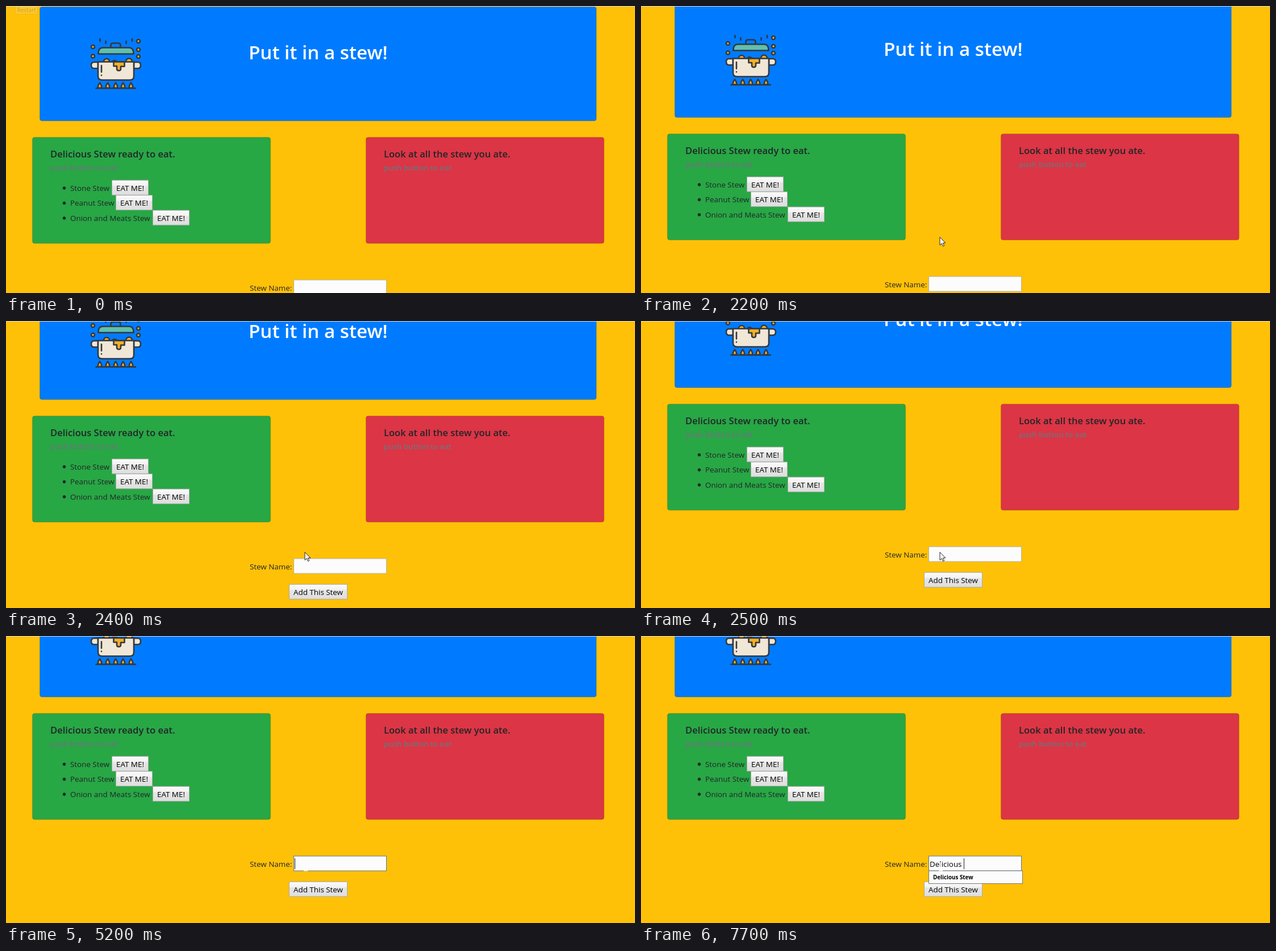
These frames come from a looping animation (1107 by 506 pixels, 8000 ms). An HTML page:

```html
<!DOCTYPE html>
<html lang="en">
<head>
<meta charset="utf-8">
<title>Put it in a stew!</title>
<style>
  html, body { margin: 0; width: 100%; height: 100%; overflow: hidden; background: #ffc107; }
  svg { display: block; width: 100vw; height: 100vh; }
  text { font: 13.4px "Open Sans", "Noto Sans", sans-serif; fill: #212529; white-space: pre; }
  .title { font-size: 33.2px; font-weight: 600; fill: #fff; text-anchor: middle; }
  .heading { font-size: 16.55px; font-weight: 600; }
  .hint { font-size: 13.25px; font-weight: 600; fill: #6c757d; }
  .label { fill: #000; text-anchor: middle; }
  .option { font-size: 9.8px; font-weight: 700; fill: #000; }
  .card { stroke: #000; stroke-opacity: .16; }
  .button { fill: url(#face); stroke: #a9a9a9; }
  .ink { stroke: #333840; stroke-width: 2.6; stroke-linejoin: round; stroke-linecap: round; }
</style>
</head>
<body>
<svg viewBox="0 0 1107 506" xmlns="http://www.w3.org/2000/svg">
  <defs>
    <linearGradient id="face" x2="0" y2="1">
      <stop offset="0" stop-color="#fbfbfb"/>
      <stop offset=".36" stop-color="#f2f2f2"/>
      <stop offset=".4" stop-color="#e6e6e6"/>
      <stop offset="1" stop-color="#dedede"/>
    </linearGradient>
  </defs>
  <rect width="1107" height="506" fill="#ffc107"/>
  <g id="page">
    <rect x="59.5" y="1.5" width="979.5" height="201" rx="4" fill="#007bff" class="card"/>
    <g id="pot" class="ink" fill="none"></g>
    <text x="549.3" y="94" class="title">Put it in a stew!</text>
    <g id="cards"></g>
    <text x="429" y="502">Stew Name:</text>
    <rect id="field" x="506.5" y="483" width="163" height="26" fill="#fcfcfc"/>
    <g id="add"></g>
  </g>
  <g id="menu">
    <rect id="menuBox" x="506.5" y="414" width="165" fill="#fcfcfc" stroke="#777"/>
    <text x="514" y="428.5" class="option">Delicious Stew</text>
    <text id="second" x="514" y="450" class="option">Dumpling Stew</text>
  </g>
  <text id="typed" x="508" y="407" style="fill:#000"></text>
  <path id="caret" d="M.5 392v19" stroke="#222"/>
  <g id="restart">
    <rect x="16.5" y=".5" width="39" height="13.5" fill="#fff" fill-opacity=".15" stroke="#a08030" stroke-opacity=".2"/>
    <text x="19.5" y="10.5" style="font-size:10px" opacity=".25">Restart</text>
  </g>
  <rect width="1107" height="1" fill="#dcdcd6"/>
  <path id="arrow" d="M.5 .5V14.6L3.8 11.6 6 16.6 8.2 15.6 6 10.8H10.4Z" fill="#fff" stroke="#222"/>
  <path id="beam" d="M527.5 399V413M524 413.7h7" fill="none" stroke="#fcfcfc" stroke-width="1.8"/>
</svg>
<script>
const $ = id => document.getElementById(id);
const label = (x, y, words, cls = '') => `<text x="${x}" y="${y}" class="${cls}">${words}</text>`;
const button = (x, y, width, words) =>
  `<rect x="${x}" y="${y}" width="${width}" height="26" class="button"/>` +
  label(x + width / 2, y + 18.5, words, 'label');
const card = (x, color, heading) =>
  `<rect x="${x}" y="231.5" width="419" height="187" rx="4" fill="${color}" class="card"/>` +
  label(x + 31.5, 267, heading, 'heading') + label(x + 31.5, 290, 'push button to eat', 'hint');
const item = (row, words, buttonX) => {
  const y = 307.2 + row * 26.5;
  return `<circle cx="102.5" cy="${y + 13.8}" r="2.7" fill="#212529"/>` +
    label(113, y + 18.7, words) + button(buttonX, y, 64, 'EAT ME!');
};

$('cards').innerHTML =
  card(46.5, '#28a745', 'Delicious Stew ready to eat.') +
  card(633.5, '#dc3545', 'Look at all the stew you ate.') +
  item(0, 'Stone Stew', 186.5) + item(1, 'Peanut Stew', 193.5) + item(2, 'Onion and Meats Stew', 258.5);
$('add').innerHTML = button(498.5, 528.3, 102, 'Add This Stew');

const shape = (d, fill = 'none') => `<path d="${d}" fill="${fill}"/>`;
const CREAM = '#f1e7d6', AMBER = '#f7b025', TEAL = '#5fc0ae';
const bubbles = [[153, 72], [153, 88.5], [233, 62], [233, 77], [233, 89]];
const flames = [165, 179, 193, 206, 220];
$('pot').innerHTML =
  shape('M165.5 58v4M175.5 62v4M211.5 62v4M222 58v4') +
  bubbles.map(([x, y]) => `<circle cx="${x}" cy="${y}" r="3" fill="${AMBER}"/>`).join('') +
  shape('M184.5 73v-4q0-3.5 4-3.5h9q4 0 4 3.5v4') +
  shape('M162.5 84.5Q162 73.5 171 73.5H216Q225 73.5 224.5 84.5Z', TEAL) +
  shape('M172 98a5 5 0 0 1 10 0M187 98a5 5 0 0 1 8 0M211 98a5.500 5.500 0 0 1 11 0', AMBER) +
  shape('M162 99H155q-5 0-5 5.500t5 5.500h7ZM225 99h7q5 0 5 5.500t-5 5.500h-7Z', CREAM) +
  shape('M162 98.500H225V124q0 6.500-7 6.500H169q-7 0-7-6.500Z', CREAM) +
  shape('M189.500 98.500v7.500h5.500v4.500q0 3.500 3.500 3.500t3.500-3.500v-4h6.500v-8Z', AMBER) +
  shape('M168 105v11.500M168 122v.2') +
  flames.map(x => shape(`M${x} 135.500q-4 5-3 9h6q1-4-3-9Z`, AMBER)).join('') +
  shape('M158.500 145H228');

// Value of the last [time, value] step reached.
const stepAt = (steps, t) => steps.reduce((value, [time, next]) => t >= time ? next : value, steps[0][1]);

const SCROLL = [[0, 0], [2200, 6], [2300, 34], [2400, 64], [2500, 85], [2600, 95]];
const ARROW = [[1100, [452, 362]], [1400, [477, 386]], [1500, [507, 402]], [1600, [523, 410]], [1800, [525.500, 407]]];
const KEYS = [5500, 5700, 5800, 5900, 6200, 6300, 6700, 6800, 7200, 7700];
const WORD = 'Delicious ';

function arrowAt(t) {
  if (t >= 1100) return stepAt(ARROW, t);
  const left = (1 - (t - 600) / 500) ** 2;
  return [452 + 280 * left, 362 + 119 * left];
}

const show = (id, visible) => $(id).style.display = visible ? '' : 'none';

function draw(ms) {
  const t = Math.floor(ms / 100) * 100;
  const focused = t >= 3100;
  $('page').setAttribute('transform', `translate(0 ${-stepAt(SCROLL, t)})`);
  $('restart').setAttribute('opacity', Math.max(0, 1 - t / 200));

  show('arrow', t >= 600 && !focused);
  $('arrow').setAttribute('transform', `translate(${arrowAt(t)})`);
  show('beam', focused);
  $('field').setAttribute('stroke', focused ? '#5c7690' : '#b4b4b0');

  const count = KEYS.filter(time => t >= time).length;
  $('typed').textContent = WORD.slice(0, count);
  const caretX = 508 + (count ? $('typed').getComputedTextLength() : 0);
  $('caret').setAttribute('transform', `translate(${Math.round(caretX)} 0)`);
  show('caret', focused && !(t >= 3600 && t < 4100) && !(t >= 4700 && t < 5200));

  show('menu', count > 0);
  show('second', count === 1);
  $('menuBox').setAttribute('height', count === 1 ? 43.500 : 22.500);
}

const start = performance.now();
function tick() {
  draw((performance.now() - start) % 8000);
  requestAnimationFrame(tick);
}
tick();
</script>
</body>
</html>
```
